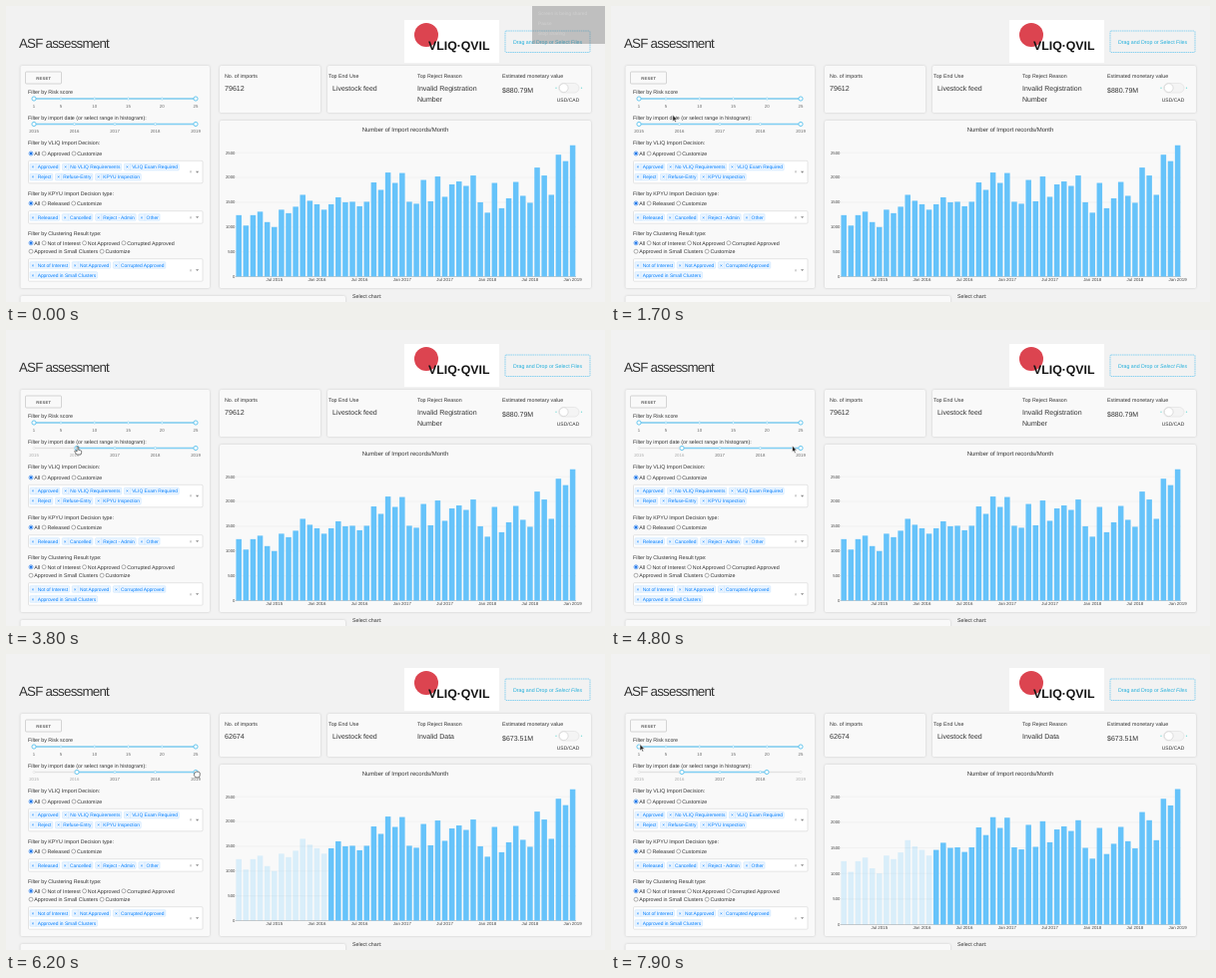
Recreate the animation shown at these times as an HTML page. Size 600 by 297 pixels, loop 8000 ms.

```html
<!DOCTYPE html>
<html lang="en">
<head>
<meta charset="utf-8">
<title>ASF assessment</title>
<style>
html, body { margin: 0; height: 100%; overflow: hidden; background: #f2f2f2; }
svg { display: block; width: 100vw; height: 100vh; }
text { font-family: "Liberation Sans", Arial, sans-serif; text-rendering: geometricPrecision; white-space: pre; }
.card { fill: #f9f9f9; filter: drop-shadow(.8px .8px .8px #c8c8c8); }
.box { fill: #fff; stroke: #ccc; stroke-width: .5; }
.tag { fill: #ebf5ff; stroke: #c2e0ff; stroke-width: .5; }
.handle { fill: #fff; stroke: #57c1ee; stroke-width: .9; }
.rail { stroke: #e2e2e2; stroke-width: 1.5; }
.track { stroke: #80d0f4; stroke-width: 1.5; }
</style>
</head>
<body>
<svg id="stage" viewBox="0 0 600 297"></svg>
<script>
const stage = document.getElementById('stage');
const DARK = '#333', LINK = '#1eaedb', TAG = '#007eff', BAR = '#66c3fa';

function el(name, attrs, parent = stage) {
  const node = document.createElementNS('http://www.w3.org/2000/svg', name);
  set(node, attrs);
  return parent.appendChild(node);
}
function set(node, attrs) {
  for (const key in attrs) node.setAttribute(key, attrs[key]);
}
function text(str, x, y, size = 5.3, attrs = {}, parent = stage) {
  const node = el('text', { x, y, 'font-size': size, fill: DARK, ...attrs }, parent);
  node.textContent = str;
  return node;
}
function rect(x, y, width, height, attrs, parent) {
  return el('rect', { x, y, width, height, ...attrs }, parent);
}
function circle(cx, cy, r, attrs) {
  return el('circle', { cx, cy, r, ...attrs });
}
const line = (x1, x2, y, attrs) => el('line', { x1, x2, y1: y, y2: y, ...attrs });
const card = (x, y, w, h) => rect(x, y, w, h, { class: 'card', rx: 1.5 });
const middle = { 'text-anchor': 'middle' };

// Header
text('ASF assessment', 13, 42, 13.3, { 'letter-spacing': -.75 });
rect(399, 14, 95, 43, { fill: '#fff' });
circle(421, 29, 12, { fill: '#dc4450' });
text('VLIQ·QVIL', 423, 44, 12.3, { 'font-weight': 'bold', fill: '#151515' });
rect(500, 25, 85, 21.5, { rx: 1, fill: 'none', stroke: '#62c4ee', 'stroke-width': .7, 'stroke-dasharray': '1.6 .6' });
const drop = text('Drag and Drop or ', 508, 38, 5.25, { fill: LINK });
const link = el('tspan', {}, drop);
link.textContent = 'Select Files';

// Filter panel
card(14.5, 60, 189.5, 223);
rect(19.5, 66, 36, 12, { rx: 1, fill: 'none', stroke: '#bbb', 'stroke-width': .6 });
text('RESET', 37.7, 73.5, 4, { 'font-weight': 'bold', 'letter-spacing': .35, fill: '#555', ...middle });

function slider(label, y, marks) {
  text(label, 22, y - 4.6);
  line(28, 190, y, { class: 'rail' });
  const track = line(28, 190, y, { class: 'track' });
  const ticks = marks.map(([value, x]) => ({
    x,
    dot: circle(x, y, 1.1, { fill: '#fff', stroke: '#80d0f4', 'stroke-width': .6 }),
    label: text(value, x, y + 8.7, 4.3, middle)
  }));
  const ends = [28, 190].map(x => circle(x, y, 2.1, { class: 'handle' }));
  return (lo, hi) => {
    set(track, { x1: lo, x2: hi });
    set(ends[0], { cx: lo });
    set(ends[1], { cx: hi });
    for (const { x, dot, label } of ticks) {
      const on = x >= lo && x <= hi;
      set(dot, { stroke: on ? '#80d0f4' : '#ddd' });
      set(label, { fill: on ? '#666' : '#aaa' });
    }
  };
}
slider('Filter by Risk score', 93, [1, 5, 10, 15, 20, 25].map(v => [v, 28 + (v - 1) * 6.75]))(28, 190);
const setDates = slider('Filter by import date (or select range in histogram):', 118.5,
  [0, 1, 2, 3, 4].map(i => [2015 + i, 28 + i * 40.5]));

function radios(y, labels, checked) {
  let x = 22.6;
  labels.forEach((label, i) => {
    const on = checked && i === 0;
    circle(x + 2.4, y, 2, { fill: '#fff', stroke: on ? '#1a73e8' : '#777', 'stroke-width': .6 });
    if (on) circle(x + 2.4, y, 1.2, { fill: '#1a73e8' });
    x += 7.2 + text(label, x + 5.7, y + 1.9).getComputedTextLength();
  });
}
function dropdown(y, rows) {
  const h = 2.5 + rows.length * 10;
  rect(22.5, y, 174.5, h, { class: 'box', rx: 1 });
  rows.forEach((labels, row) => {
    let x = 24;
    const top = y + 3 + row * 10;
    for (const label of labels) {
      const tag = rect(x, top, 0, 6.6, { class: 'tag', rx: .7 });
      text('×', x + 1.6, top + 5, 4.8, { fill: TAG });
      const w = 9 + text(label, x + 7.7, top + 5, 4.85, { fill: TAG }).getComputedTextLength();
      set(tag, { width: w });
      line(x + 6, x + 6, top, { y2: top + 6.6, stroke: '#c2e0ff', 'stroke-width': .5 });
      x += w + 2.8;
    }
  });
  const mid = y + h / 2;
  text('×', 185, mid + 1.8, 5, { fill: '#999', ...middle });
  el('path', { d: `M190 ${mid - .7}h3.2l-1.6 1.8z`, fill: '#888' });
}

text('Filter by VLIQ Import Decision:', 22, 139);
radios(148, ['All', 'Approved', 'Customize'], true);
dropdown(155.3, [['Approved', 'No VLIQ Requirements', 'VLIQ Exam Required'], ['Reject', 'Refuse-Entry', 'KPYU Inspection']]);
text('Filter by KPYU Import Decision type:', 22, 189.5);
radios(198, ['All', 'Released', 'Customize'], true);
dropdown(205.7, [['Released', 'Cancelled', 'Reject - Admin', 'Other']]);
text('Filter by Clustering Result type:', 22, 229.7);
radios(237.8, ['All', 'Not of Interest', 'Not Approved', 'Corrupted Approved'], true);
radios(246.2, ['Approved in Small Clusters', 'Customize']);
dropdown(253.7, [['Not of Interest', 'Not Approved', 'Corrupted Approved'], ['Approved in Small Clusters']]);

// Key figures
const infoCards = [card(214, 60, 101, 47), card(322, 60, 264, 47)];
text('No. of imports', 219, 71.7);
text('Top End Use', 323, 71.7);
text('Top Reject Reason', 412, 71.7);
text('Estimated monetary value', 497, 71.7);
const count = text('', 219, 84.6, 7.1);
text('Livestock feed', 327, 84.6, 7);
const reason = text('', 412, 84.6, 7);
const reasonEnd = text('', 412, 95.6, 7);
const money = text('', 497, 87.2, 7);
rect(553.5, 77.5, 20.5, 9.5, { rx: 4.7, fill: '#f4f4f4', stroke: '#d8d8d8', 'stroke-width': .5 });
circle(558.7, 82.2, 4.4, { fill: '#fff', stroke: '#c9c9c9', 'stroke-width': .6 });
for (const x of [551, 576.5]) circle(x, 82.2, .7, { fill: '#7fdcd8' });
text('USD/CAD', 563, 95.6, 5, middle);

// Histogram
const chartCard = card(214, 115, 372, 168);
const chartTitle = text('Number of Import records/Month', 400, 126, 6, middle);
const counts = [
  124, 103, 124, 131, 110, 100, 135, 128, 141, 165, 153, 146,
  135, 146, 160, 150, 151, 142, 151, 190, 175, 210, 189, 209,
  151, 147, 195, 152, 202, 161, 186, 192, 183, 204, 150, 129,
  189, 138, 158, 191, 163, 149, 220, 204, 165, 246, 233, 265
];
const barX = i => 233.2 + i * 7.115;
const grid = [0, 500, 1000, 1500, 2000, 2500].map(value => ({
  value,
  rule: line(230, 571, 0, { stroke: value ? '#e9e9e9' : '#999', 'stroke-width': .5 }),
  label: text(value, 229.3, 0, 4.2, { 'text-anchor': 'end', fill: '#444' })
}));
const bars = counts.map((n, i) => rect(barX(i) - 2.75, 0, 5.5, 0, { fill: BAR }));
const months = [...Array(8).keys()].map(k =>
  text(`${k % 2 ? 'Jan' : 'Jul'} ${2015 + Math.ceil(k / 2)}`, barX(5 + 6 * k), 0, 4.4, { fill: '#444', ...middle }));

function layoutChart(shift, base) {
  const scale = (base - 147.2 - shift) / 2500;
  set(chartTitle, { y: 126 + shift });
  for (const { value, rule, label } of grid) {
    const y = base - value * scale;
    set(rule, { y1: y, y2: y });
    set(label, { y: y + 1.4 });
  }
  bars.forEach((bar, i) => {
    const height = counts[i] * 10 * scale;
    set(bar, { y: base - height, height });
  });
  months.forEach(m => set(m, { y: base + 4.8 }));
}

// Next row
card(14.5, 291, 325.5, 20);
text('Select chart:', 347, 293);

// Fading notice
const notice = el('g', {});
rect(527, 0, 73, 38, { fill: '#777', opacity: .42 }, notice);
['Screen is being shared', 'Pause', 'Stop sharing'].forEach((s, i) =>
  text(s, 533, 9 + i * 10, 4.8, { fill: '#ddd', opacity: .55 }, notice));

// Pointer
const shapes = {
  arrow: 'M0 0V6.6L1.5 5.2 2.5 7.4 3.6 6.9 2.6 4.8H4.7Z',
  hand: 'M-.9-3.4a.8.8 0 0 1 1.6 0V-.6l2.2.5q1 .3.8 1.4L3 4H-1.4L-3.2.9q-.2-1 .8-.8L-.9 1Z',
  grab: 'M-2.6-1q0-1 1-1 .8-.7 1.6-.2 1-.5 1.5.2 1.2 0 1.2 1V1L2 3.4H-1.6L-3.2 1Q-3.4 0-2.6 0Z'
};
const pointer = el('path', { 'stroke-linejoin': 'round', 'stroke-width': .6 });
const path = [
  [700, 231, 56, 'arrow'], [800, 180, 82, 'arrow'], [1000, 180, 82, 'arrow'], [1900, 28, 117, 'arrow'],
  [2000, 28, 121, 'hand'], [3000, 28, 121, 'hand'], [3100, 31, 121, 'grab'], [3800, 72, 121, 'hand'],
  [4000, 72, 119, 'arrow'], [4800, 181.5, 116, 'arrow'], [5000, 185, 116.5, 'arrow'], [5200, 188, 120, 'hand'],
  [5500, 191.5, 120.5, 'hand'], [5800, 191.5, 120.5, 'grab'], [6500, 191.5, 120.5, 'grab'],
  [6900, 157, 120.5, 'hand'], [7000, 157, 119, 'arrow'], [7900, 29, 90.5, 'arrow']
];

const ramp = (t, t0, t1, a, b) => a + (b - a) * Math.min(1, Math.max(0, (t - t0) / (t1 - t0)));

function drawPointer(t) {
  const i = path.findLastIndex(p => p[0] <= t);
  if (i < 0) return set(pointer, { visibility: 'hidden' });
  const [t0, x0, y0, shape] = path[i];
  const [t1, x1, y1] = path[i + 1] || [t0 + 1, x0, y0];
  const black = shape === 'arrow';
  set(pointer, {
    visibility: 'visible',
    d: shapes[shape],
    fill: black ? '#222' : '#fff',
    stroke: black ? '#fff' : '#222',
    transform: `translate(${ramp(t, t0, t1, x0, x1)} ${ramp(t, t0, t1, y0, y1)})`
  });
}

function draw(t) {
  const updated = t >= 5900;
  const shift = updated ? -4 : 0;
  set(notice, { opacity: ramp(t, 0, 300, 1, 0) });
  set(link, { 'font-style': t >= 4100 ? 'italic' : 'normal' });
  setDates(ramp(t, 3000, 3800, 28, 71), ramp(t, 6500, 6900, 190, 156));

  count.textContent = updated ? '62674' : '79612';
  reason.textContent = updated ? 'Invalid Data' : 'Invalid Registration';
  reasonEnd.textContent = updated ? '' : 'Number';
  money.textContent = updated ? '$673.51M' : '$880.79M';

  infoCards.forEach(c => set(c, { height: 47 + shift }));
  set(chartCard, { y: 115 + shift, height: 168 - shift });
  layoutChart(shift, updated && t < 6400 ? 267.5 : 271.5);
  bars.forEach((bar, i) => set(bar, { opacity: t >= 5700 && i < 13 ? .22 : 1 }));
  drawPointer(t);
}

function tick() {
  draw(Math.floor(performance.now() % 8000 / 100) * 100);
  requestAnimationFrame(tick);
}
tick();
</script>
</body>
</html>
```
